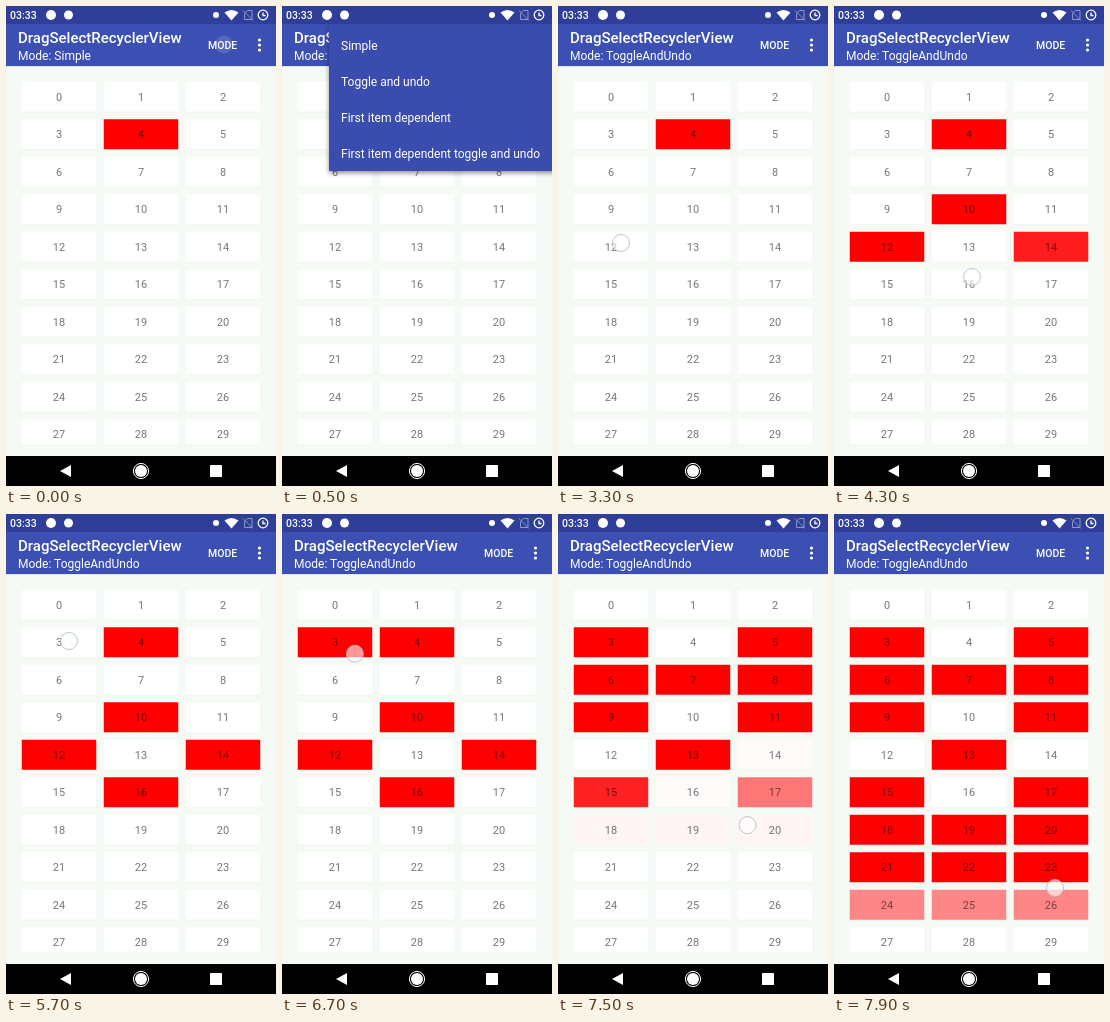
Animation of 270x480 px, one loop 8000 ms. Source, as an HTML page:

```html
<!DOCTYPE html>
<html lang="en">
<head>
<meta charset="utf-8">
<title>Drag select grid</title>
<style>
html, body { margin: 0; width: 100%; height: 100%; overflow: hidden; background: #000; }
svg { display: block; width: 100%; height: 100%; }
text { font-family: Roboto, "Open Sans", sans-serif; fill: #fff; }
.bold { font-weight: 500; }
.num { font-size: 11px; text-anchor: middle; fill: #000; fill-opacity: .54; }
.item, #mode { font-size: 12px; }
.net { font-size: 6.3px; text-anchor: end; }
</style>
</head>
<body>
<svg viewBox="0 0 270 480">
  <defs>
    <clipPath id="list"><rect y="60" width="270" height="378"/></clipPath>
    <clipPath id="reveal"><rect id="revealBox" y="18"/></clipPath>
    <clipPath id="row"><rect x="47" y="57" width="223" height="36"/></clipPath>
    <filter id="blur"><feGaussianBlur stdDeviation="2.5"/></filter>
  </defs>
  <rect width="270" height="450" fill="#f5faf5"/>
  <g id="cells" clip-path="url(#list)"></g>

  <rect y="60" width="270" height="1" opacity=".08"/>
  <rect y="18" width="270" height="42" fill="#3b50b2"/>
  <text class="bold" x="12" y="37" font-size="15">DragSelectRecyclerView</text>
  <text id="mode" x="12" y="54"></text>
  <circle id="press" cx="218" cy="38.500" fill="#fff"/>
  <text class="bold" x="202" y="43" font-size="10.5">MODE</text>
  <g fill="#fff">
    <circle cx="253.500" cy="34" r="1.600"/><circle cx="253.500" cy="39" r="1.600"/><circle cx="253.500" cy="44" r="1.600"/>
  </g>

  <rect width="270" height="18" fill="#2f3e98"/>
  <text class="bold" x="4" y="13" font-size="10.500">03:33</text>
  <g fill="#fff">
    <circle cx="45" cy="9" r="5"/>
    <circle cx="62.500" cy="9" r="4.500"/>
    <circle cx="210" cy="9" r="3"/>
    <path d="M218.500 6.500Q225.500 1.500 232.500 6.500L225.500 14.500Z"/>
  </g>
  <g fill="none" stroke="#8d96c8">
    <path d="M238.500 13.500V7.500L241.500 4.500H246V13.500ZM237 4.500L247 14.500"/>
    <path stroke="#fff" stroke-width="1.300" d="M257 6.500V9.500H259.500M252.200 9a4.800 4.800 0 1 1 9.600 0a4.800 4.800 0 1 1-9.600 0"/>
  </g>
  <g id="speed">
    <text class="net" x="198" y="8">0B/s</text>
    <text class="net" x="198" y="15">142B/s</text>
    <path fill="#fff" d="M199.500 8.500L201.500 5.500L203.500 8.500ZM199.500 11L201.500 14L203.500 11Z"/>
  </g>

  <g id="menu" clip-path="url(#reveal)">
    <rect x="47" y="20" width="230" height="147" opacity=".45" filter="url(#blur)"/>
    <rect x="47" y="18" width="223" height="147" fill="#3a4dae"/>
    <g id="hit" clip-path="url(#row)">
      <rect x="47" y="57" width="223" height="36" fill="#fff" opacity=".06"/>
      <circle id="ripple" cx="145" cy="75" fill="#fff" opacity=".07"/>
      <rect x="59" y="67" width="199" height="16" fill="#3646a2"/>
      <circle cx="141" cy="75" r="8" fill="#fff" opacity=".14"/>
    </g>
    <text class="item" x="59" y="44">Simple</text>
    <text class="item" x="59" y="80">Toggle and undo</text>
    <text class="item" x="59" y="116">First item dependent</text>
    <text class="item" x="59" y="152">First item dependent toggle and undo</text>
  </g>

  <circle id="touch" r="8.500" fill="#fff" fill-opacity=".6" stroke="#a9bcc6" stroke-opacity=".8"/>

  <rect y="450" width="270" height="30"/>
  <g fill="#fff">
    <path d="M54 465L65 459V471Z"/>
    <circle cx="135" cy="465" r="6"/>
    <circle cx="135" cy="465" r="7.600" fill="none" stroke="#fff"/>
    <rect x="204" y="459" width="12" height="12" rx=".5"/>
  </g>
</svg>
<script>
const LOOP = 8000, FADE = 250;
const $ = id => document.getElementById(id);
const clamp = x => Math.min(1, Math.max(0, x));
const ramp = (t, from, to) => clamp((t - from) / (to - from));
const ease = x => .5 - .5 * Math.cos(Math.PI * clamp(x));
const mix = (a, b, p) => a + (b - a) * p;
const set = (el, attrs) => { for (const k in attrs) el.setAttribute(k, attrs[k]); };

// cell: time it is tapped on
const taps = { 12: 3400, 10: 3750, 14: 4105, 16: 4400 };
// [time, last cell of the dragged range], which begins at cell 3
const ranges = [[6200, 3], [6870, 6], [6985, 7], [7080, 10], [7205, 13],
  [7310, 16], [7370, 17], [7470, 20], [7610, 23], [7780, 26]];
// each stroke is a path of [time, x, y]
const strokes = [
  [[3300, 63, 237], [3420, 63, 237]],
  [[3650, 137, 202], [3770, 137, 202]],
  [[3990, 218, 239], [4110, 218, 239]],
  [[4290, 138, 271], [4420, 138, 271]],
  [[5700, 63, 127], [6550, 63, 127], [6870, 84, 154], [6985, 99, 170], [7080, 120, 196],
   [7200, 155, 253], [7310, 170, 269], [7470, 186, 303], [7610, 202, 340], [7780, 216, 371], [7900, 221, 374], [8000, 222, 377]]
];

const add = (tag, attrs, text = "") => {
  const el = document.createElementNS("http://www.w3.org/2000/svg", tag);
  set(el, attrs);
  el.textContent = text;
  return $("cells").appendChild(el);
};
const cells = Array.from({ length: 30 }, (_, i) => {
  const x = 15.75 + 82 * (i % 3), y = 75.75 + 37.5 * Math.floor(i / 3);
  const box = { x, y, width: 74.5, height: 30 };
  add("rect", { ...box, y: y + .6, rx: 1, opacity: .04 });
  add("rect", { ...box, rx: 1, fill: "#fefffe" });
  const red = add("rect", { ...box, fill: "#f00" });
  add("text", { class: "num", x: x + 37.25, y: y + 19.1 }, i);
  return red;
});

// Crossfade: the new look fades in over the old one fading out
function redness(i, t) {
  let on = i === 4, start = -FADE;
  if (t >= taps[i]) { on = true; start = taps[i]; }
  const hit = i >= 3 && ranges.find(r => r[1] >= i);
  if (hit && t >= hit[0]) { on = !on; start = hit[0]; }
  const p = ease((t - start) / FADE);
  return on ? p : (1 - p) ** 2;
}

function touchAt(t) {
  const path = strokes.find(s => t >= s[0][0] && t < s[s.length - 1][0]);
  if (!path) return null;
  const k = path.findIndex(p => p[0] > t), a = path[k - 1], b = path[k];
  const p = ramp(t, a[0], b[0]);
  return { cx: mix(a[1], b[1], p), cy: mix(a[2], b[2], p) };
}

function draw(t) {
  cells.forEach((red, i) => set(red, { opacity: redness(i, t) }));
  $("mode").textContent = "Mode: " + (t < 1900 ? "Simple" : "ToggleAndUndo");
  set($("press"), { r: mix(9, 20, ramp(t, 50, 500)), opacity: .14 * (1 - ramp(t, 100, 500)) });
  set($("speed"), { opacity: t >= 1400 && t < 2100 ? 1 : 0 });

  const open = ease(ramp(t, 120, 450));
  const left = mix(225, 38, open);
  set($("revealBox"), { x: left, width: 270 - left, height: mix(24, 158, open) });
  set($("menu"), { opacity: ramp(t, 120, 300) * (1 - ramp(t, 1880, 2080)) });
  set($("hit"), { opacity: ramp(t, 1390, 1500) });
  set($("ripple"), { r: mix(6, 34, ramp(t, 1400, 1850)) });

  const touch = touchAt(t);
  set($("touch"), { ...touch, opacity: touch ? 1 : 0 });
}

const begin = performance.now();
function tick() {
  draw((performance.now() - begin) % LOOP);
  requestAnimationFrame(tick);
}
tick();
</script>
</body>
</html>
```
